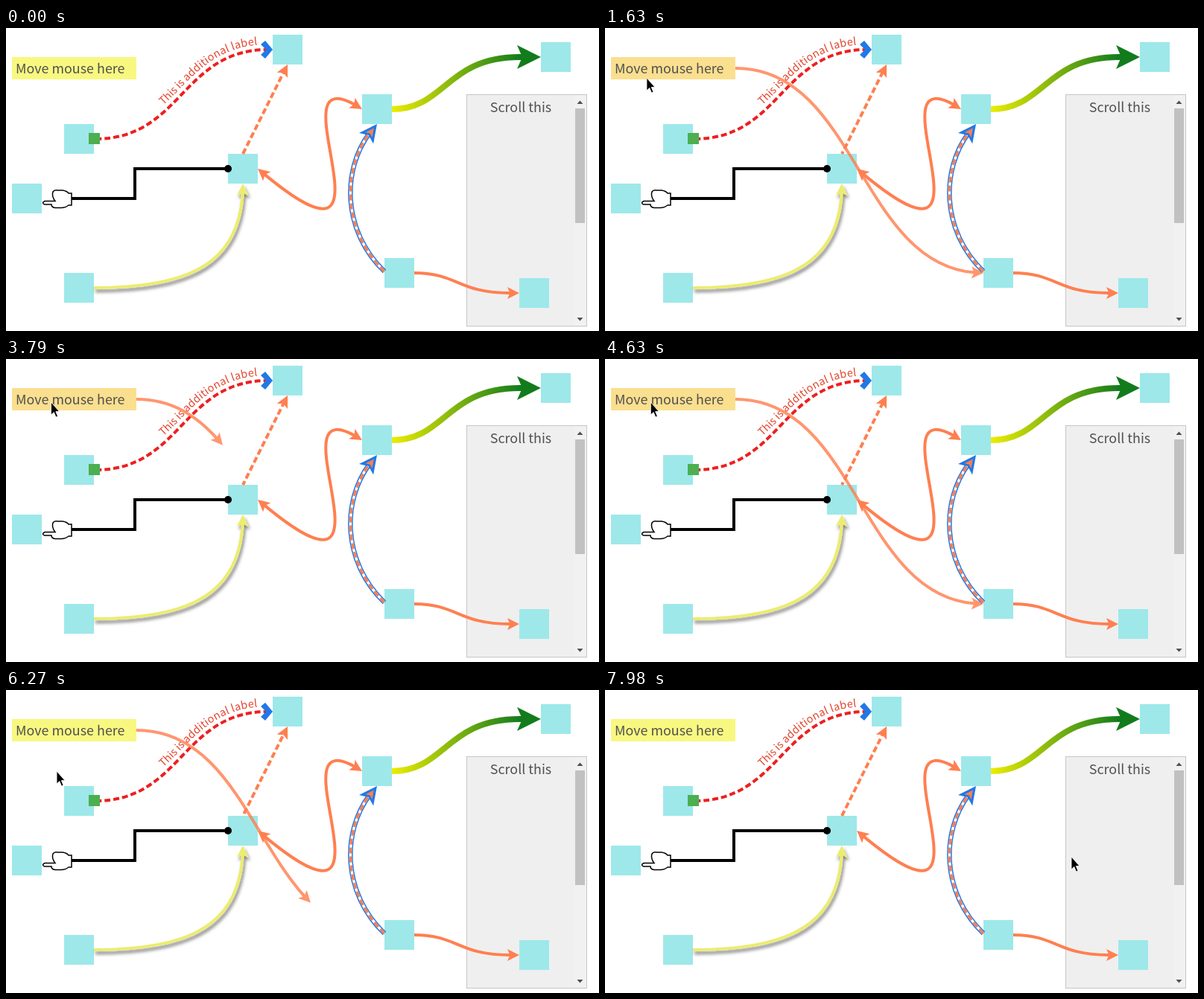
Recreate the animation shown at these times as an HTML page. Size 796x407 px, loop 8000 ms.

```html
<!DOCTYPE html>
<html lang="en">
<head>
<meta charset="utf-8">
<title>Connector lines</title>
<style>
  html, body { margin: 0; width: 100%; height: 100%; overflow: hidden; background: #fff; }
  svg { display: block; }
  text { font: 17.9px "Noto Sans CJK JP", "Noto Sans CJK SC", "Noto Sans CJK", "Open Sans", sans-serif; fill: #505050; }
  .line { fill: none; stroke-width: 4; }
  .coral { stroke: #ff7f50; }
</style>
</head>
<body>
<svg width="796" height="407" viewBox="0 0 796 407">
  <defs>
    <path id="head" d="M0 0L-16-8L-12.5 0L-16 8Z"/>
    <path id="redPath"/>
    <path id="bluePath" d="M508 327C451 272 451 191 488 141"/>
    <linearGradient id="fade" gradientUnits="userSpaceOnUse" x1="518" y1="0" x2="690" y2="0">
      <stop offset="0" stop-color="#ecec00"/>
      <stop offset="1" stop-color="#127c1c"/>
    </linearGradient>
    <filter id="shadow" filterUnits="userSpaceOnUse" x="100" y="195" width="240" height="175">
      <feDropShadow dx="2" dy="4" stdDeviation="2" flood-color="#000" flood-opacity=".5"/>
    </filter>
  </defs>

  <!-- scroll panel -->
  <rect x="618.5" y="89.5" width="161" height="311" fill="#efefef" stroke="#c6c6c6"/>
  <rect x="763" y="90" width="16" height="310" fill="#f1f1f1"/>
  <rect x="764" y="108" width="13" height="154" fill="#c1c1c1"/>
  <path d="M766.5 102L770.5 97.5L774.5 102ZM766.5 389L770.5 393.5L774.5 389Z" fill="#505050"/>
  <text x="691" y="113" text-anchor="middle">Scroll this</text>

  <rect id="label" x="8" y="39" width="167" height="30"/>
  <text x="13" y="61">Move mouse here</text>

  <g id="boxes" fill="#9ee8ea"></g>

  <!-- red dashed line with its text -->
  <use href="#redPath" class="line" stroke="#ee1f1f" stroke-dasharray="8 4"/>
  <text dy="-7" style="font-size:14.3px;fill:#e2452f"><textPath href="#redPath" startOffset="107">This is additional label</textPath></text>
  <rect x="111" y="141" width="15" height="15" fill="#4caf50"/>
  <path d="M358 29L348 17L342 22L349 29L342 36L348 41Z" fill="#2078e8"/>

  <!-- marching dashes -->
  <path id="march" class="line coral" d="M318 169L372.6 59.7" stroke-dasharray="8 4"/>
  <use href="#head" fill="#ff7f50" transform="translate(378 49) rotate(-63.4)"/>

  <!-- stepped line -->
  <path class="line" stroke="#000" d="M80 229H173V189H298"/>
  <circle cx="298" cy="189" r="5"/>
  <path d="M52 232.5H66Q61 226 63 220Q65 217 69 218H76Q82 219 84 222H88V238H84Q80 241.500 74 241.500H66Q61 241 61 237H52Q47 235 52 232.500Z" fill="#fff" stroke="#000" stroke-width="1.5"/>

  <g id="arrows"></g>

  <!-- outlined line -->
  <use href="#bluePath" class="line" stroke="#2078e8" style="stroke-width:6.5px"/>
  <use href="#bluePath" class="line" stroke="#fff" style="stroke-width:3.5px"/>
  <use href="#bluePath" class="line coral" style="stroke-width:3.5px" stroke-dasharray="8 4"/>
  <g transform="translate(498 129) rotate(-53)">
    <use href="#head" fill="#2078e8" transform="scale(1.5)"/>
    <use href="#head" fill="#ff7f50" transform="translate(-7 0) scale(.7)"/>
  </g>

  <g id="hover" opacity=".82"></g>
  <path id="cursor" d="M0 0V17L3.800 13.500L6.500 20L9 19L6.300 12.500H11Z" stroke="#fff" stroke-width=".8"/>
</svg>

<script>
const SVG = "http://www.w3.org/2000/svg";
const byId = id => document.getElementById(id);
const CORAL = "#ff7f50", LOOP = 8000, STEP = 77.4, DRAW = 200;

function add(parent, tag, attrs) {
  const el = parent.appendChild(document.createElementNS(SVG, tag));
  for (const name in attrs) el.setAttribute(name, attrs[name]);
  return el;
}

function box(x, y) {
  add(byId("boxes"), "rect", { x, y, width: 40, height: 40 });
}

// Left to right S-curve; the lead is a straight run into a large head.
function sCurve(x1, y1, x2, y2, lead = 0) {
  const mid = (x1 + x2) / 2 - lead;
  return `M${x1} ${y1}C${mid} ${y1} ${mid} ${y2} ${x2 - lead} ${y2}H${x2}`;
}

// A curve with an arrow head; show(part) reveals its first part.
function arrow(parent, d, color, { scale = 1, both = false, stroke = color } = {}) {
  const group = add(parent, "g", {});
  const path = add(group, "path", { d, fill: "none", stroke, "stroke-width": 4 * scale });
  const total = path.getTotalLength(), trim = 11 * scale;
  const addHead = () => add(group, "use", { href: "#head", fill: color });

  function place(head, at, behind) {
    const tip = path.getPointAtLength(at), back = path.getPointAtLength(behind);
    const angle = Math.atan2(tip.y - back.y, tip.x - back.x) * 180 / Math.PI;
    head.setAttribute("transform", `translate(${tip.x} ${tip.y}) rotate(${angle}) scale(${scale})`);
  }

  if (both) place(addHead(), 0, trim);
  const endHead = addHead();
  function show(part) {
    const length = Math.max(1, total * part), start = both ? trim : 0;
    group.setAttribute("visibility", part > 0 ? "visible" : "hidden");
    path.setAttribute("stroke-dasharray", `0 ${start} ${Math.max(0, length - trim - start)} 9999`);
    place(endHead, length, Math.max(0, length - trim));
  }
  show(1);
  return { group, show };
}

box(358, 9);
box(718, 19);
box(478, 89);
box(78, 129);
box(298, 169);
box(8, 209);
box(508, 309);
box(78, 329);
box(689, 336);

byId("redPath").setAttribute("d", sCurve(120, 149, 352, 29));
const arrows = byId("arrows");
arrow(arrows, "M338 189C553 372 344 22 478 109", CORAL, { both: true });
arrow(arrows, sCurve(518, 109, 718, 39, 28), "#127c1c", { scale: 2, stroke: "url(#fade)" });
arrow(arrows, sCurve(548, 329, 689, 356, 12), CORAL);
arrow(arrows, "M118 349C258 349 318 309 318 209", "#ecec70")
  .group.setAttribute("filter", "url(#shadow)");
const hoverLine = arrow(byId("hover"), sCurve(175, 54, 508, 329), CORAL);

// The pointer glides straight between a few places.
const stops = [
  { t: 77, x: 572, y: 300 },
  { t: 640, x: 26, y: 62 },
  { t: 1625, x: 56, y: 67 },
  { t: 2000, x: 36, y: 115 },
  { t: 3400, x: 36, y: 115 },
  { t: 3800, x: 61, y: 57 },
  { t: 6200, x: 62, y: 60 },
  { t: 6269, x: 68, y: 109 },
  { t: 6966, x: 163, y: 322 },
  { t: 7663, x: 508, y: 275 },
  { t: 7972, x: 626, y: 224 }
];
const visits = [{ enter: 640, leave: 1700 }, { enter: 3720, leave: 6205 }];

const clamp = v => Math.min(1, Math.max(0, v));
const ease = v => v * v * (3 - 2 * v);
const mix = (a, b, k) => a + (b - a) * k;

function pointer(t) {
  const i = Math.max(1, stops.findIndex(stop => stop.t >= t));
  const a = stops[i - 1], b = stops[i], k = clamp((t - a.t) / (b.t - a.t));
  return [mix(a.x, b.x, k), mix(a.y, b.y, k)];
}

function render(time) {
  // The pointer and lines advance in whole steps.
  const t = Math.min(Math.floor((time + 16) / STEP) * STEP, stops.at(-1).t);
  const progress = since => ease(clamp((t - since) / DRAW));
  const part = visits.reduce((sum, v) => sum + progress(v.enter) - progress(v.leave), 0);
  const hovered = visits.some(v => t >= v.enter && t < v.leave);
  hoverLine.show(part);
  byId("label").setAttribute("fill", hovered ? "#fadf8f" : "#f8f881");
  byId("march").setAttribute("stroke-dashoffset", -12 * t / 1000);
  byId("cursor").setAttribute("transform", `translate(${pointer(t)})`);
  byId("cursor").setAttribute("visibility", t > 0 ? "visible" : "hidden");
}

const begin = performance.now();
function tick() {
  render((performance.now() - begin) % LOOP);
  requestAnimationFrame(tick);
}
tick();
</script>
</body>
</html>
```
